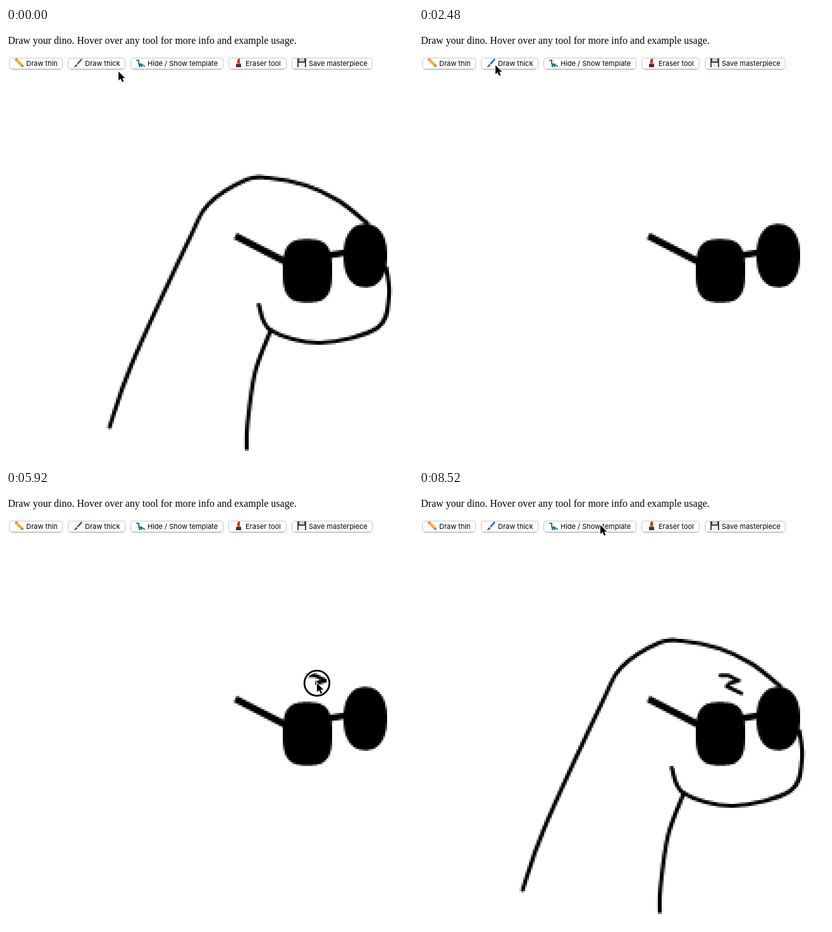
These frames come from a looping animation (644 by 688 pixels, 8920 ms). An HTML page with a canvas:

```html
<!DOCTYPE html>
<html lang="en">
<head>
<meta charset="utf-8">
<title>Draw your dino</title>
<style>
  html, body { margin: 0; width: 100%; height: 100%; overflow: hidden; background: #fff; }
  canvas, svg { position: absolute; left: 0; top: 0; }
  canvas { width: 645px; height: 690px; image-rendering: pixelated; }
  .intro { font: 16px "Liberation Serif", Times, serif; }
  .label { font: 11px Inter, Roboto, sans-serif; }
</style>
</head>
<body>
<canvas id="board" width="215" height="230"></canvas>
<svg width="644" height="688" viewBox="0 0 644 688">
  <text class="intro" x="3" y="25">Draw your dino. Hover over any tool for more info and example usage.</text>
  <g id="toolbar"></g>
  <g id="pointer">
    <g id="ring" fill="none" stroke="#fff">
      <circle r="19.6" stroke-width="6"/>
      <circle r="19.8" stroke="#000" stroke-width="2.8"/>
    </g>
    <path d="M0 0V14L3.4 11 5.8 16.5 8.4 15.4 6 10.2H10.4Z"
      stroke="#fff" stroke-width="2" paint-order="stroke"/>
  </g>
</svg>
<script>
const LOOP = 8920, STEP = 40, CELL = 3;
const HIDE = 1000, SHOW = 8360, DRAW = 4200, LIFT = 7320;
const byId = id => document.getElementById(id);
const ctx = byId('board').getContext('2d');

const icons = {
  pencil: `<path d="M3 3 11 11" stroke="#f7ad35" stroke-width="4.4"/>
    <path d="M1 1 3 3" stroke="#e8736c" stroke-width="4.4"/>
    <path d="M9.4 12.6 12.6 9.4 14 14Z" fill="#8a6a48"/>`,
  brush: `<path d="M13 1 6 9" stroke="#2458c4" stroke-width="2.6"/>
    <path d="M4 9 6 11Q4 14 0 14 3 12 4 9Z" fill="#4a3426"/>`,
  dino: `<g fill="none" stroke="#2f7590" stroke-width="2">
    <path d="M0 3H4V9L9 10 14 13M5 10V14M8 10V14"/>
    <path d="M5 10H9" stroke-width="4"/></g>`,
  lipstick: `<path d="M5 7V2Q7 0 9 0V7Z" fill="#d92c2c"/>
    <path d="M4 7H10V9H4Z" fill="#b88a45"/>
    <path d="M3 9H11V14H3Z" fill="#5b2629"/>`,
  disk: `<path d="M0 0H14V14H0Z" fill="#39424e"/>
    <path d="M3 0H11V5H3Z" fill="#c9ced4"/>
    <path d="M2 7H12V14H2Z" fill="#eef1f4"/>`
};

let left = 5;
for (const [label, width, icon] of [
  ['Draw thin', 85, 'pencil'], ['Draw thick', 91, 'brush'],
  ['Hide / Show template', 147, 'dino'], ['Eraser tool', 92, 'lipstick'],
  ['Save masterpiece', 128, 'disk']
]) {
  byId('toolbar').innerHTML += `<g transform="translate(${left} 47)">
    <rect x=".5" y=".5" width="${width - 1}" height="17.5" rx="4" fill="#fff" stroke="#c6c6c6"/>
    <path d="M4 18.3H${width - 4}" stroke="#aaa"/>
    <g transform="translate(9 1)">${icons[icon]}</g>
    <text class="label" x="27" y="13">${label}</text></g>`;
  left += width + 8;
}

// Places where the pointer rests
const stops = [
  { arrive: 0, leave: 40, x: 178, y: 69 },
  { arrive: 680, leave: 1040, x: 233, y: 61 },
  { arrive: 1720, leave: 1800, x: 301, y: 168 },
  { arrive: 2480, leave: 2520, x: 121, y: 59 },
  { arrive: 2880, leave: 3060, x: 25, y: 54 },
  { arrive: 3960, leave: 4000, x: 476, y: 297 },
  { arrive: DRAW, leave: 5000, x: 477, y: 292 },
  { arrive: 5120, leave: 5120, x: 490, y: 292 },
  { arrive: 5360, leave: 5560, x: 506, y: 300 },
  { arrive: 5720, leave: 5920, x: 492, y: 304 },
  { arrive: 6240, leave: 6480, x: 487, y: 309 },
  { arrive: 7160, leave: LIFT, x: 510, y: 320 },
  { arrive: 8080, leave: LOOP, x: 287, y: 54 }
];
const presses = [[880, HIDE], [2900, 3060], [DRAW, LIFT], [8240, SHOW]];

// Glide between stops, slowing down on arrival
function pointerAt(t) {
  const i = stops.findIndex(s => t <= s.leave), to = stops[i];
  if (t >= to.arrive) return [to.x, to.y];
  const from = stops[i - 1];
  const u = (t - from.leave) / (to.arrive - from.leave), k = u * (2 - u);
  return [from.x + (to.x - from.x) * k, from.y + (to.y - from.y) * k];
}

function line(points, width) {
  ctx.beginPath();
  points.forEach(p => ctx.lineTo(...p));
  ctx.lineWidth = width;
  ctx.stroke();
}

// Smooth line through a few points
function curve(...points) {
  ctx.beginPath();
  ctx.moveTo(...points[0]);
  points.slice(1).forEach((c, i) => {
    const b = points[i], a = points[i - 1] || b, d = points[i + 2] || c;
    ctx.bezierCurveTo(b[0] + (c[0] - a[0]) / 6, b[1] + (c[1] - a[1]) / 6,
      c[0] - (d[0] - b[0]) / 6, c[1] - (d[1] - b[1]) / 6, ...c);
  });
  ctx.lineWidth = 6.4;
  ctx.stroke();
}

// Superellipse: a higher power gives a squarer lens
function lens(cx, cy, rx, ry, power) {
  const bend = v => Math.sign(v) * Math.abs(v) ** (2 / power);
  ctx.beginPath();
  for (let a = 0; a < 2 * Math.PI; a += .05)
    ctx.lineTo(cx + rx * bend(Math.cos(a)), cy + ry * bend(Math.sin(a)));
  ctx.fill();
}

function drawTemplate() {
  curve([164, 631], [198, 534], [290, 334], [320, 279], [380, 240], [415, 237],
    [475, 249], [526, 273], [572, 309]);
  curve([602, 380], [606, 425], [588, 474], [497, 498], [419, 478], [400, 438]);
  curve([419, 478], [394, 545], [382, 628], [381, 665]);
}

function drawGlasses() {
  ctx.lineCap = 'butt';
  line([[363, 329], [443, 370]], 11);
  line([[508, 360], [538, 355]], 10);
  lens(477, 384, 39, 50, 3);
  lens(568.5, 360, 34.5, 50, 2.3);
}

function drawMark(t) {
  const points = [];
  for (let s = DRAW; s <= Math.min(t, LIFT); s += STEP) points.push(pointerAt(s));
  ctx.lineCap = 'round';
  line(points, 6);
}

function render(t) {
  ctx.setTransform(1 / CELL, 0, 0, 1 / CELL, 0, 0);
  ctx.clearRect(0, 0, 645, 690);
  ctx.lineJoin = ctx.lineCap = 'round';
  if (t < HIDE || t >= SHOW) drawTemplate();
  drawGlasses();
  if (t >= DRAW) drawMark(t);
  byId('pointer').setAttribute('transform', `translate(${pointerAt(t)})`);
  const pressed = presses.some(([from, to]) => t >= from && t < to);
  byId('ring').setAttribute('visibility', pressed ? 'visible' : 'hidden');
}

const start = performance.now();
function tick() {
  const t = (performance.now() - start) % LOOP;
  render(Math.floor(t / STEP) * STEP);
  requestAnimationFrame(tick);
}
tick();
</script>
</body>
</html>
```
